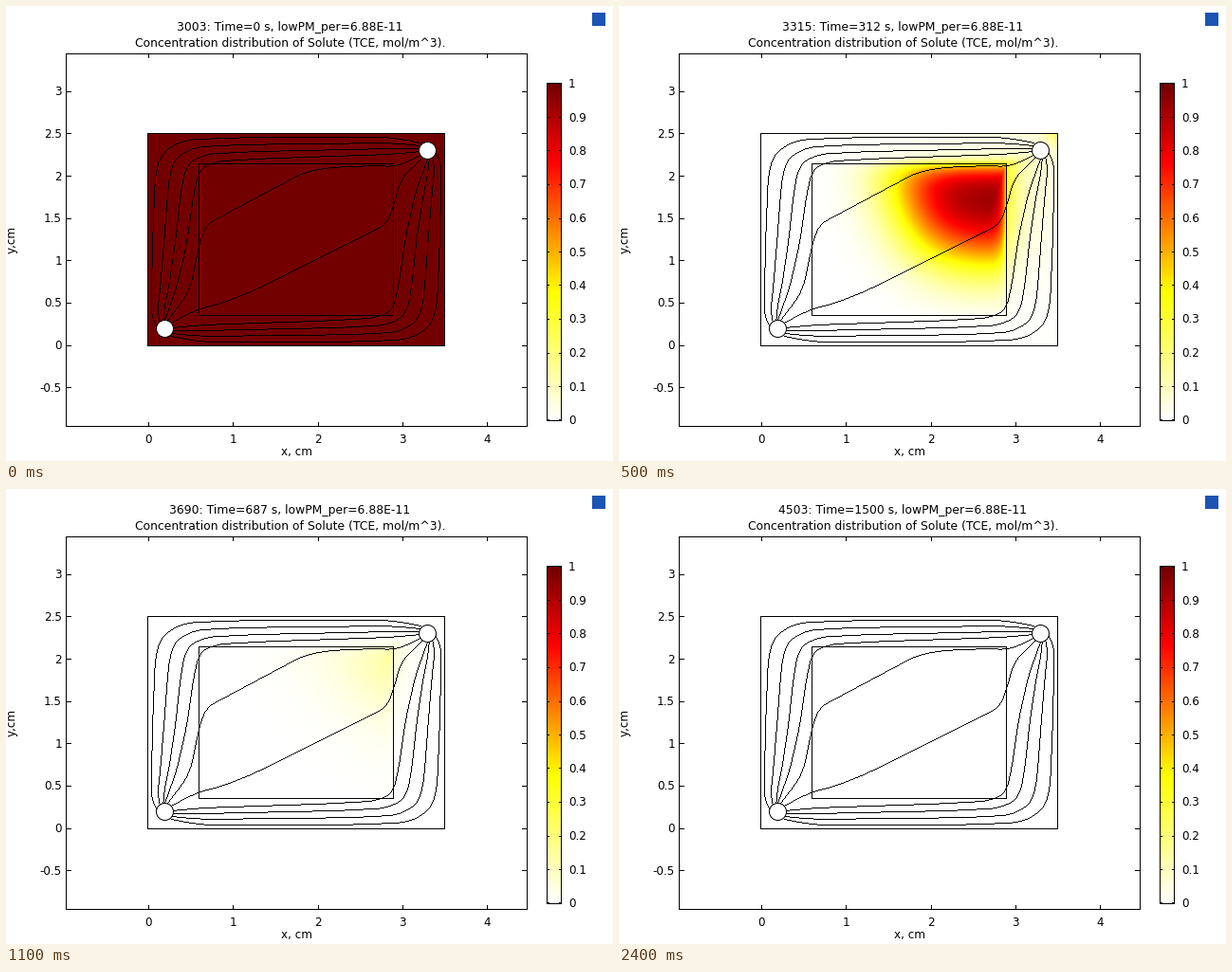
Animation of 640x480 px, one loop 2.5 s. Source, as a matplotlib script:

```python
import numpy as np
import matplotlib.pyplot as plt
from matplotlib.animation import FuncAnimation
from matplotlib.colors import LinearSegmentedColormap
from matplotlib.patches import Circle, Rectangle

W, H, DPI = 640, 480, 80
FRAMES, INTERVAL = 25, 100
PX = 72 / DPI                       # points per pixel

plt.rcParams["font.family"] = "DejaVu Sans"
fig = plt.figure(figsize=(W / DPI, H / DPI), dpi=DPI, facecolor="white")
ax = fig.add_axes([0, 0, 1, 1])
ax.axis("off")

heat = LinearSegmentedColormap.from_list(
    "heat", [(0, "#ffffff"), (0.38, "#ffff00"), (0.77, "#ff0000"), (1, "#730000")], N=512)

# ---- one-pixel line work, collected in a transparent black layer ----
ink = np.zeros((H, W, 4))


def stroke(points):
    x, y = np.array(points, float).T
    s = np.r_[0, np.cumsum(np.maximum(abs(np.diff(x)), abs(np.diff(y))))]
    u = np.append(np.arange(0, s[-1]), s[-1])
    ink[np.rint(np.interp(u, s, y)).astype(int),
        np.rint(np.interp(u, s, x)).astype(int), 3] = 1


def box(x0, y0, x1, y1):
    stroke([(x0, y0), (x1, y0), (x1, y1), (x0, y1), (x0, y0)])


def rounded(points, radius=16):
    """Polyline with each corner replaced by a quadratic curve."""
    p = np.array(points, float)
    u = np.linspace(0, 1, 9)[:, None]
    parts = [p[:1]]
    for a, b, c in zip(p, p[1:], p[2:]):
        la, lc = np.linalg.norm(a - b), np.linalg.norm(c - b)
        r = min(radius, la / 2, lc / 2)
        start, end = b + (a - b) * r / la, b + (c - b) * r / lc
        parts.append((1 - u) ** 2 * start + 2 * u * (1 - u) * b + u**2 * end)
    return np.vstack(parts + [p[-1:]])


def label(x, y, text, ha="center", va="baseline", size=12, **kw):
    return ax.text(x, y, text, ha=ha, va=va, fontsize=size * PX, color="black", **kw)


def show(data, extent, z=1):
    return ax.imshow(data, cmap=heat, vmin=0, vmax=1, interpolation="nearest",
                     extent=extent, aspect="auto", zorder=z)


# ---- concentration field ----
LEFT, RIGHT, TOP, BOTTOM = 149, 462, 134, 358
BX0, BX1, BY0, BY1 = 203, 408, 166, 326              # low-permeability block
X, Y = np.meshgrid(np.arange(LEFT, RIGHT + 1), np.arange(TOP, BOTTOM + 1))

# The outer channel is flushed later the farther it lies from the inlet.
path = np.maximum(0.9 * (X - 167) + 1.1 * (340 - Y), 0)
corner = np.exp(-((X - RIGHT) ** 2 + (Y - TOP) ** 2) / 200)
flush = (10 + 0.335 * path) * (1 + 0.35 * corner)

inside = (X > BX0) & (X < BX1) & (Y > BY0) & (Y < BY1)
depth = np.minimum.reduce([(BX1 - X) / 5, (Y - BY0) / 13, (X - BX0) / 5, (BY1 - Y) / 5])
skin = np.exp(-np.maximum(depth, 0))
XC, YC = np.clip(X, 210, 402), np.clip(Y, 172, 320)
plume = np.exp(-np.hypot((X - np.clip(X, BX0, BX1)) / 14, (Y - np.clip(Y, BY0, BY1)) / 5))


def cdf(z):
    z = np.clip(z, -6, 6)
    return 1 / (1 + np.exp(-1.5976 * z - 0.07056 * z**3))


def field(t):
    """Two fronts drift up and right through the block, widening as they go."""
    front_x = 202 + 0.29 * t + 7e-5 * t**2
    front_y = 335 - 0.228 * t
    spread = 2 + 0.104 * t
    tilt = 0.25 * (1 - np.exp(-t / 60))

    def block(x, y):
        return cdf((x - front_x - tilt * (y - 200)) / spread) * cdf((front_y - y) / spread)

    outer = 1 / (1 + (t / flush) ** 4.5)
    edge = 0.65 * outer + 0.35 * block(XC, YC)
    return np.where(inside,
                    block(X, Y) * (1 - skin) + edge * skin,
                    outer + (edge - outer) * plume)


image = show(field(0), (LEFT, RIGHT + 1, BOTTOM + 1, TOP))
show(np.linspace(1, 0, 355)[:, None], (571, 585, 437, 82))

# ---- streamlines ----
# Channel line k is the outermost one shifted by k steps; the lower channel
# is the upper one turned half a circle.
base = np.array([(161, 343), (152.5, 325), (153, 300), (154, 250), (156, 200), (157, 178),
                 (163, 155), (185, 141), (235, 138.5), (405, 138), (437, 144)])
step = np.array([(2, -4), (7, -4), (9, -2), (12, 0), (13.7, 0), (15, 0),
                 (15, 4.7), (13, 7.4), (13, 7.3), (0, 6), (0, 3)])
for k in range(4):
    c = rounded(base + k * step)
    stroke(c)
    stroke((LEFT + RIGHT, TOP + BOTTOM) - c)

stroke(rounded([(170, 331), (193, 301), (204, 248), (211, 230), (314, 175),
                (340, 170), (388, 168), (412, 169), (437, 157)]))
stroke(rounded([(174, 334), (190, 325), (207, 318), (224, 314), (256, 302),
                (401, 230), (409, 208), (416, 181), (438, 160)]))

box(LEFT, TOP, RIGHT, BOTTOM)
box(BX0, BY0, BX1, BY1)
for cx, cy in ((167.5, 340.5), (444.5, 152.5)):
    ax.add_patch(Circle((cx, cy), 9, fc="white", ec="black", lw=PX, zorder=4))

# ---- axes frame ----
box(63, 50, 549, 443)
for i in range(5):
    x = 150 + 89.3 * i
    stroke([(x, 50), (x, 54)])
    stroke([(x, 439), (x, 443)])
    label(x, 461, str(i))
for i in range(-1, 7):
    y = 357.6 - 44.65 * i
    stroke([(63, y), (68, y)])
    stroke([(544, y), (549, y)])
    label(59, y + 4.5, f"{i / 2:g}", ha="right")
label(306.5, 474, "x, cm")
label(6.5, 246.5, "y,cm", rotation=90, va="center")

# ---- colour bar ----
box(570, 81, 585, 437)
for i in range(11):
    y = 436.5 - 35.5 * i
    stroke([(570, y), (572, y)])
    stroke([(583, y), (585, y)])
    label(593, y + 4.5, f"{i / 10:g}", ha="left")

show(ink, (0, W, H, 0), z=3)
ax.set_xlim(0, W)
ax.set_ylim(H, 0)

ax.add_patch(Rectangle((618, 7), 14, 14, fc="#1c54b4", ec="none", zorder=4))

title = label(299, 26, "", size=12.4)
label(299.5, 42, "Concentration distribution of Solute (TCE, mol/m^3).", size=12.4)


def draw(k):
    t = 62.5 * k
    title.set_text(f"{3003 + int(t)}: Time={int(t)} s, lowPM_per=6.88E-11")
    image.set_data(field(t))
    return title, image


anim = FuncAnimation(fig, draw, frames=FRAMES, interval=INTERVAL, repeat=True)
plt.show()
```
